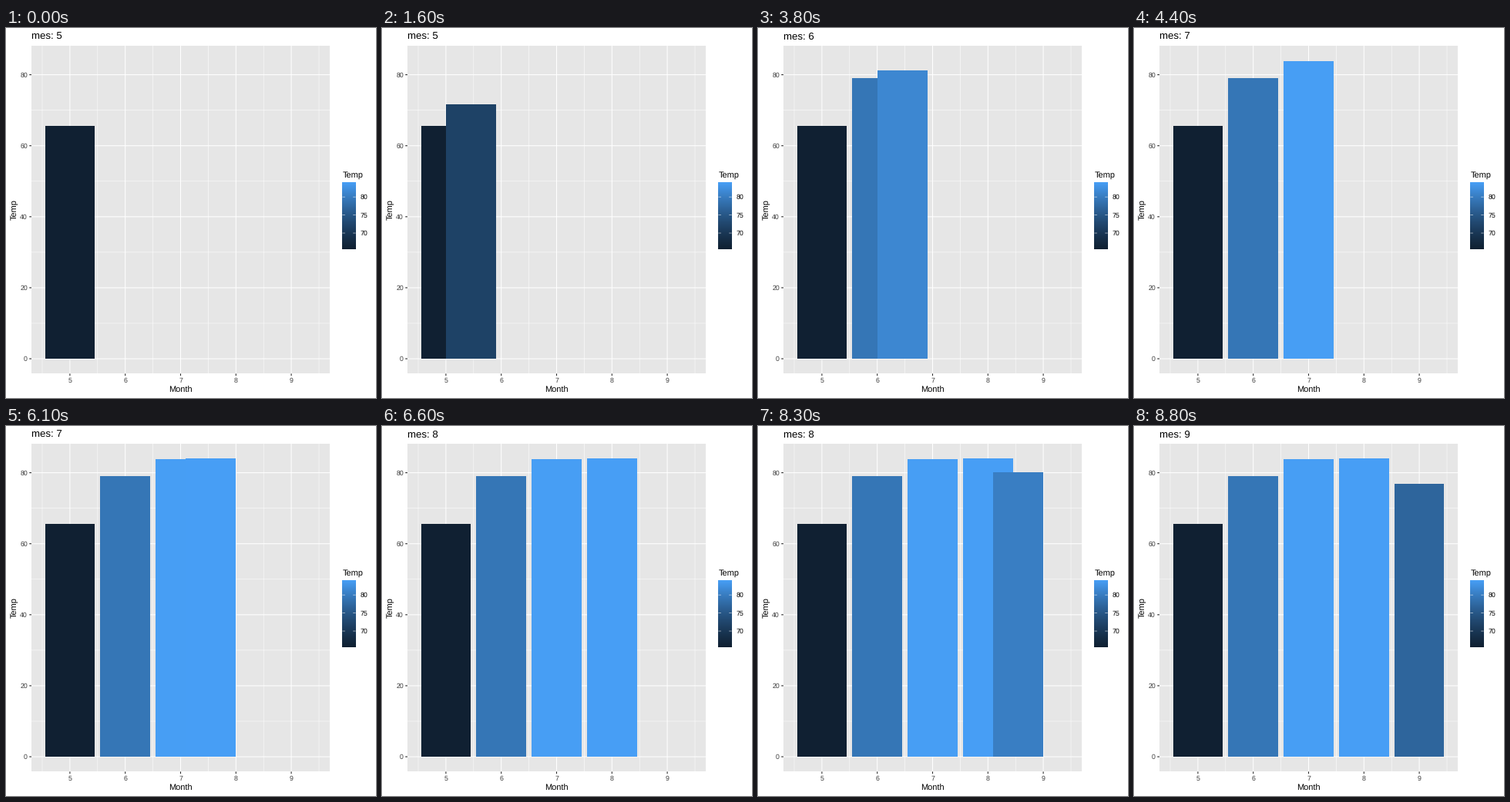
Write a matplotlib script that moves like this. It is 480 by 480 pixels and loops after 10 s.

```python
import numpy as np
import matplotlib.pyplot as plt
from matplotlib.animation import FuncAnimation
from matplotlib.patches import Rectangle

plt.rcParams["font.family"] = "Liberation Sans"
plt.rcParams["text.hinting"] = "none"

SIZE = 480
LEFT, TOP, RIGHT, BOTTOM = 33, 23, 420, 448.4
MONTHS = [5, 6, 7, 8, 9]
TEMPS = [65.55, 79.1, 83.9, 83.97, 76.9]
LOW, HIGH = min(TEMPS), max(TEMPS)
STEPS, CYCLE, HOLD = 11, 22, 12

AXIS_TEXT = "#3c3c3c"
TICK = "#262626"

TO_XYZ = np.array([[0.4124, 0.3576, 0.1805],
                   [0.2126, 0.7152, 0.0722],
                   [0.0193, 0.1192, 0.9505]])
WHITE = TO_XYZ.sum(axis=1)


def to_lab(rgb):
    """Cube-root cone values; blending these equals blending in Lab."""
    c = np.array(rgb) / 255
    linear = np.where(c > 0.04045, ((c + 0.055) / 1.055) ** 2.4, c / 12.92)
    v = TO_XYZ @ linear / WHITE
    return np.where(v > 0.008856, np.cbrt(v), 7.787 * v + 16 / 116)


DARK = to_lab([19, 43, 65])
LIGHT = to_lab([89, 174, 247])


def fill(temp):
    """Blue ramp for a temperature, encoded with a 1.8 gamma."""
    t = (temp - LOW) / (HIGH - LOW)
    f = DARK + (LIGHT - DARK) * t
    v = np.where(f > 0.2069, f ** 3, (f - 16 / 116) / 7.787)
    linear = np.linalg.solve(TO_XYZ, v * WHITE)
    return np.clip(linear, 0, 1) ** (1 / 1.8)


def px(month):
    return LEFT + (month - 4.305) / 5.39 * (RIGHT - LEFT)


def py(temp):
    return BOTTOM - (temp / HIGH + 0.05) / 1.1 * (BOTTOM - TOP)


fig = plt.figure(figsize=(SIZE / 72, SIZE / 72), dpi=72, facecolor="white")
ax = fig.add_axes([0, 0, 1, 1])
ax.axis("off")


def line(xs, ys, color="white", width=1.07, z=1):
    ax.plot(xs, ys, color=color, lw=width, zorder=z, snap=False,
            solid_capstyle="butt")


def label(x, y, text, size, color="black", **kw):
    return ax.text(x, y, text, fontsize=size, color=color,
                   va=kw.pop("va", "baseline"), **kw)


def draw_panel():
    ax.add_patch(Rectangle((LEFT, TOP), RIGHT - LEFT, round(BOTTOM) - TOP,
                           fc="#e6e6e6", lw=0, zorder=0))
    for m in np.arange(4.5, 10):
        line([px(m)] * 2, [TOP, BOTTOM], width=0.53)
    for t in range(10, 80, 20):
        line([LEFT, RIGHT], [py(t)] * 2, width=0.53)
    for m in MONTHS:
        x = px(m)
        line([x, x], [TOP, BOTTOM])
        line([x, x], [BOTTOM, BOTTOM + 2.75], TICK)
        label(x, 460, str(m), 8.8, AXIS_TEXT, ha="center")
    for t in range(0, 81, 20):
        y = py(t)
        line([LEFT, RIGHT], [y, y])
        line([LEFT - 2.75, LEFT], [y, y], TICK)
        label(28, y + 3.2, str(t), 8.8, AXIS_TEXT, ha="right")
    label((LEFT + RIGHT) / 2, 473, "Month", 11, ha="center")
    label(13.4, (TOP + BOTTOM) / 2, "Temp", 11, ha="right", va="center",
          rotation=90, rotation_mode="default").set(
              rotation_mode="anchor", ha="center", va="baseline")


def draw_legend():
    x0, x1, y0, y1 = 436.4, 453.7, 200.5, 286.9
    ramp = np.array([[fill(t)] for t in np.linspace(HIGH, LOW, 87)])
    ax.imshow(ramp, extent=[x0, x1, y1, y0], aspect="auto",
              interpolation="bilinear", zorder=2)
    for t in (70, 75, 80):
        y = y1 - (t - LOW) / (HIGH - LOW) * (y1 - y0)
        line([x0, x0 + 3.45], [y, y], width=0.53, z=3)
        line([x1 - 3.45, x1], [y, y], width=0.53, z=3)
        label(459.2, y + 3.2, str(t), 8.8)
    label(436.4, 194, "Temp", 11)


def place(bar, month, temp):
    x0, x1 = round(px(month - 0.45)), round(px(month + 0.45))
    y0, y1 = round(py(temp)), round(py(0))
    bar.set_bounds(x0, y0, x1 - x0, y1 - y0)
    bar.set_facecolor(fill(temp))


def new_bar(z):
    return ax.add_patch(Rectangle((0, 0), 0, 0, lw=0, zorder=z))


draw_panel()
draw_legend()
title = label(33, 15, "", 13.2)
bars = [new_bar(4) for _ in MONTHS]
for bar, month, temp in zip(bars, MONTHS, TEMPS):
    place(bar, month, temp)
mover = new_bar(5)

ax.set_xlim(0, SIZE)
ax.set_ylim(SIZE, 0)


def update(frame):
    state, k = divmod(frame - HOLD, CYCLE)
    step = k + 1
    moving = step < STEPS
    if moving:
        s = step / STEPS
        a, b = TEMPS[state], TEMPS[state + 1]
        place(mover, MONTHS[state] + s, a + (b - a) * s)
    mover.set_visible(moving)

    last = state if moving else state + 1
    for i, bar in enumerate(bars):
        bar.set_visible(i <= last)
    nearest = state if step <= 6 else state + 1
    title.set_text(f"mes: {MONTHS[nearest]}")
    return [title, mover, *bars]


anim = FuncAnimation(fig, update, frames=100, interval=100, repeat=True,
                     repeat_delay=0, blit=False)
plt.show()
```
